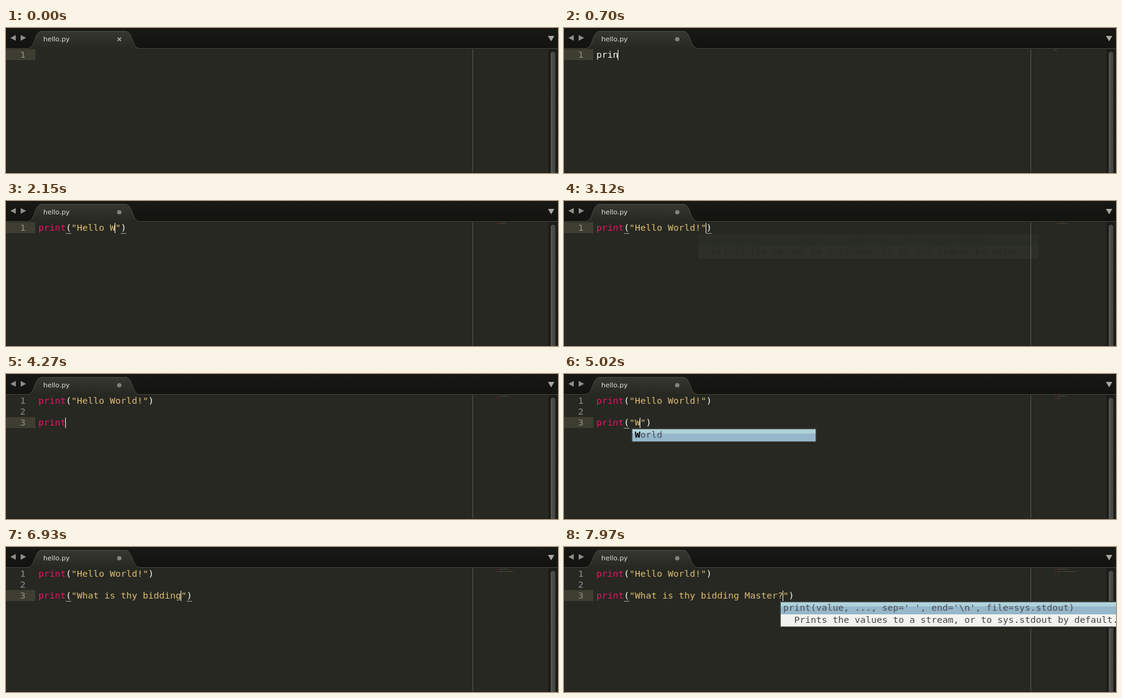
An HTML page for the animation above (8000 ms loop, 904x239 px).

```html
<!DOCTYPE html>
<html lang="en">
<head>
<meta charset="utf-8">
<title>hello.py</title>
<style>
html, body { margin: 0; width: 100%; height: 100%; overflow: hidden; background: #272822; }
#stage { position: relative; width: 904px; height: 239px; overflow: hidden; background: #272822;
  font: 14.95px/18px "DejaVu Sans Mono", monospace; white-space: pre; color: #f8f8f2; }
#stage div, #stage svg { position: absolute; }
#stage svg { left: 0; top: 0; }
.title { font: 11px "DejaVu Sans", sans-serif; fill: #deded8; }
#code { left: 53px; top: 35px; }
#map { left: 803px; top: 35px; transform: scale(.11111); transform-origin: 0 0; opacity: .75; }
#nums { left: 0; top: 35px; width: 32px; text-align: right; color: #8f8f88; }
#active { left: 0; width: 48px; height: 18px; background: #3e3d32; }
#caret { width: 1px; height: 17px; background: #f8f8f0; }
.under { width: 9px; height: 1px; background: #a3a39b; }
.kw { color: #ee1466; }
.str { color: #dcbd72; }
#ruler { left: 764px; top: 35px; width: 1px; height: 204px; background: #56574f; }
#track { left: 888px; top: 35px; width: 16px; height: 204px; background: #1d1e1a; }
#thumb { left: 891px; top: 38px; width: 8px; height: 230px; border-radius: 5px; border: 1px solid #151612;
  background: linear-gradient(90deg, #565753, #40413d); }
#foot { left: 0; top: 238px; width: 888px; height: 1px; background: #1f201b; }
#popup { box-sizing: border-box; border: 2px solid #3b3c39; background: #f2f3ee; color: #45454a;
  box-shadow: 0 1px 2px rgba(0, 0, 0, .3); }
#stage #popup p { margin: 0; height: 20px; padding-left: 4px; line-height: 19px; overflow: hidden; }
#popup p:first-child { background: linear-gradient(#b0d2d9 7px, #96b7ca 7px); color: #494c58; }
#popup b { color: #000; }
</style>
</head>
<body>
<div id="stage">
  <svg width="904" height="36">
    <defs>
      <linearGradient id="bar" x2="0" y2="1">
        <stop stop-color="#181914"/><stop offset="1" stop-color="#13140f"/>
      </linearGradient>
      <linearGradient id="tab" x2="0" y2="1">
        <stop stop-color="#363731"/><stop offset="1" stop-color="#272822"/>
      </linearGradient>
    </defs>
    <rect width="904" height="33" fill="url(#bar)"/>
    <path d="M0 32.5H904" stroke="#0d0e0a"/>
    <path d="M0 33.5H904" stroke="#42433c"/>
    <path d="M36 34C48 33 46 6 58 5.5H196C208 6 206 33 218 34Z" fill="url(#tab)"/>
    <path d="M36 33.5C48 33 46 6 58 5.5H196C208 6 206 33 218 33.5" fill="none" stroke="#4b4c46"/>
    <path d="M16 11.5V21L7 16.2ZM24 11.5V21L33 16.2Z" fill="#8e8f89"/>
    <path d="M887.5 13H898L892.8 22Z" fill="#a6a7a1"/>
    <text class="title" x="61" y="22">hello.py</text>
    <path id="close" d="M182.8 15.8L188.4 21.4M188.4 15.8L182.8 21.4" stroke="#a3a49d" stroke-width="1.8"/>
    <circle id="dirty" cx="185.5" cy="18.5" r="3.6" fill="#82837c"/>
  </svg>
  <div id="active"></div>
  <div id="nums"></div>
  <div id="ruler"></div>
  <div id="code"></div>
  <div id="map"></div>
  <div class="under" id="open"></div>
  <div class="under" id="shut"></div>
  <div id="caret"></div>
  <div id="track"></div>
  <div id="thumb"></div>
  <div id="foot"></div>
  <div id="popup"></div>
</div>
<script>
const LOOP = 8000, CH = 9, ROW = 18, LEFT = 53, TOP = 35;
const $ = id => document.getElementById(id);

const keys = [
  [200, 'p'], [370, 'r'], [490, 'i'], [690, 'n'], [890, 't'], [1050, '('], [1160, '"'],
  [1340, 'H'], [1500, 'e'], [1630, 'l'], [1790, 'l'], [1950, 'o'], [1990, ' '],
  [2070, 'W'], [2370, 'o'], [2480, 'r'], [2600, 'ld'], [2890, '!'], [3080, '"'],
  [3380, '\n'], [3540, '\n'],
  [3790, 'p'], [3920, 'r'], [4010, 'i'], [4090, 'n'], [4230, 't'], [4590, '('], [4670, '"'],
  [4940, 'W'], [5110, 'h'], [5280, 'a'], [5610, 't '], [5720, 'i'], [5870, 's'], [5930, ' '],
  [6010, 't'], [6060, 'h'], [6200, 'y'], [6240, ' '], [6320, 'b'], [6360, 'i'],
  [6630, 'dd'], [6700, 'i'], [6780, 'n'], [6930, 'g'], [7020, ' '],
  [7100, 'M'], [7260, 'a'], [7400, 's'], [7520, 'te'], [7670, 'r'], [7870, '?']
];

const tip = { width: 561, rows: [
  "print(value, ..., sep=' ', end='\\n', file=sys.stdout)",
  '  Prints the values to a stream, or to sys.stdout by default.'
] };
const snippets = { width: 304, rows: ['property'] };
const words = { width: 304, rows: ['print', 'property', 'World'] };

// list, line, column, appears, solid, starts to fade, gone
const popups = [
  [snippets, 0, 0, 240, 280, 490, 570],
  [tip, 0, 6, 1050, 1090, 1160, 1200],
  [tip, 0, 13, 1990, 2030, 2070, 2150],
  [tip, 0, 19, 2930, 2970, 3080, 3200],
  [words, 2, 0, 3790, 3830, 4230, 4270],
  [tip, 2, 6, 4590, 4630, 4670, 4750],
  [words, 2, 7, 4980, 5020, 5110, 5190],
  [tip, 2, 12, 5610, 5720, 5930, 5930],
  [tip, 2, 15, 5930, 5970, 6240, 6240],
  [tip, 2, 19, 6240, 6280, 6360, 6440],
  [tip, 2, 27, 7020, 7060, 7400, 7520],
  [tip, 2, 34, 7870, 7970, LOOP, LOOP]
];

// Auto-closed characters right of the caret
function tail(typed) {
  if (!typed.includes('(')) return '';
  return typed.split('"').length === 2 ? '")' : ')';
}

function paint(line) {
  const [, word, open, str, shut] = line.match(/^(\w*)(\(?)("[^"]*"|)(\)?)$/);
  return `<span class="${word === 'print' ? 'kw' : ''}">${word}</span>${open}<span class="str">${str}</span>${shut}`;
}

// Fuzzy match: the row with matched letters in bold, or null
function mark(row, query) {
  let n = 0, out = '';
  for (const c of row) {
    const hit = n < query.length && c.toLowerCase() === query[n].toLowerCase();
    if (hit) n++;
    out += hit ? `<b>${c}</b>` : c;
  }
  return n === query.length ? out : null;
}

function place(el, x, y, show = true) {
  el.style.left = x + 'px';
  el.style.top = y + 'px';
  el.style.display = show ? '' : 'none';
}

function drawPopup(t, typed) {
  const p = popups.find(p => t >= p[3] && t < p[6]);
  if (!p) return place($('popup'), 0, 0, false);
  const [list, line, col, , solid, fade] = p;
  let query = typed.slice(col), rows;
  while (!(rows = list.rows.map(r => mark(r, query)).filter(Boolean)).length) query = query.slice(0, -1);
  const el = $('popup');
  el.innerHTML = rows.map(r => `<p>${r}</p>`).join('');
  el.style.width = list.width + 'px';
  el.style.opacity = t < solid ? .4 : t < fade ? 1 : t < fade + 40 ? .5 : .03;
  place(el, LEFT - 6 + col * CH, TOP + (line + 1) * ROW);
}

function draw(t) {
  const typed = keys.filter(k => k[0] <= t).map(k => k[1]).join('').split('\n');
  const row = typed.length - 1, now = typed[row], end = tail(now);
  const y = TOP + row * ROW;
  const html = typed.map(s => paint(s + tail(s))).join('\n');
  $('code').innerHTML = html;
  $('map').innerHTML = html;
  $('nums').textContent = typed.map((_, i) => i + 1).join('\n');
  $('close').style.display = now || row ? 'none' : '';
  $('dirty').style.display = now || row ? '' : 'none';
  place($('active'), 0, y);
  place($('caret'), LEFT - 1 + now.length * CH, y + 1, t >= 200);
  place($('open'), LEFT + 5 * CH, y + ROW, end !== '');
  place($('shut'), LEFT + (now.length + end.length - 1) * CH, y + ROW, end !== '');
  drawPopup(t, now);
}

let start, last = -1;
function tick(time) {
  start ??= time;
  const t = Math.floor((time - start) % LOOP / 10) * 10;
  if (t !== last) draw(last = t);
  requestAnimationFrame(tick);
}
draw(0);
requestAnimationFrame(tick);
</script>
</body>
</html>
```
